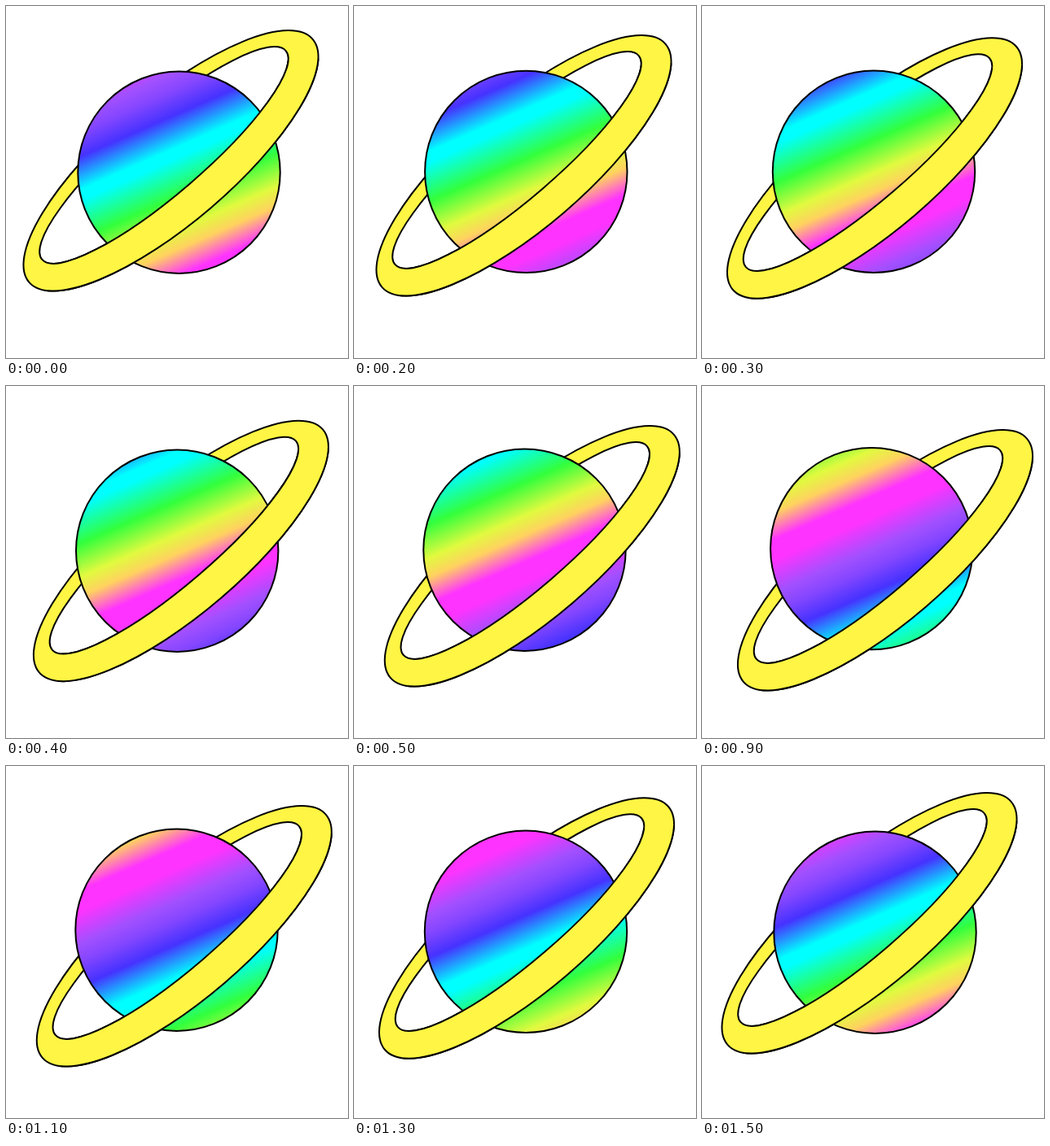
Animation, 420 px wide and 433 px high, one loop 1600 ms. Source, as an HTML page with a canvas:

```html
<!DOCTYPE html>
<html lang="en">
<head>
<meta charset="utf-8">
<title>Rainbow planet</title>
<style>
  html, body { margin: 0; width: 100%; height: 100%; overflow: hidden; background: #fff; }
  canvas { display: block; }
</style>
</head>
<body>
<canvas id="stage" width="420" height="433"></canvas>
<script>
const ctx = document.getElementById('stage').getContext('2d');

const STEP = 100;
const STEPS = 16;
const TILT = -40.65 * Math.PI / 180;
const SLOPE = 0.44;
const PERIOD = 318;

// Offsets per step on the way out; the way back mirrors them.
const ringX = [0, 3, 6, 9.5, 12.4, 16.3, 19.3, 22.5, 23.4];
const ringY = [0, 3, 6, 9.2, 12.6, 19, 22, 24, 26.2];
const planetX = [0, 0, -1.2, -1.5, -2.3, -3, -3.6, -4.2, -4.4];
const planetY = [0, 0, -0.8, -0.9, -2, -3, -3.7, -4.6, -5];

// Step and scroll distance of the color bands.
const scrollKeys = [[0, 0], [7, 163], [11, 232], [13, 267], [15, 305], [16, 318]];

// Distance down the band cycle and color.
const bands = [
  [14, '#ff33ff'], [39, '#ff33ff'], [79, '#a250ff'], [102, '#8446ff'],
  [132, '#4632ff'], [173, '#00ffff'], [186, '#00ffff'], [234, '#33ff3c'],
  [275, '#e1fa3f'], [299, '#ffd25f']
];

function scrollAt(step) {
  const i = scrollKeys.findIndex(key => key[0] > step);
  const [s0, d0] = scrollKeys[i - 1];
  const [s1, d1] = scrollKeys[i];
  return d0 + (d1 - d0) * (step - s0) / (s1 - s0);
}

function bandGradient(scroll) {
  const top = bands[0][0] - scroll;
  const length = PERIOD * 3;
  const reach = length / (1 + SLOPE * SLOPE);
  const gradient = ctx.createLinearGradient(212, top, 212 + SLOPE * reach, top + reach);
  for (let copy = 0; copy < 3; copy++) {
    for (const [at, color] of bands) {
      gradient.addColorStop((at - bands[0][0] + copy * PERIOD) / length, color);
    }
  }
  gradient.addColorStop(1, bands[0][1]);
  return gradient;
}

function drawRing(x, y) {
  const outer = new Path2D();
  outer.ellipse(202.5 + x, 190.3 + y, 229.5, 76, TILT, 0, Math.PI * 2);
  const inner = new Path2D();
  inner.ellipse(194 + x, 183.5 + y, 197.2, 47.3, TILT, 0, Math.PI * 2);
  const band = new Path2D(outer);
  band.addPath(inner);
  ctx.fillStyle = '#fff544';
  ctx.fill(band, 'evenodd');
  ctx.stroke(outer);
  ctx.stroke(inner);
}

function drawPlanet(x, y, scroll) {
  ctx.beginPath();
  ctx.arc(212.5 + x, 204.7 + y, 124.2, 0, Math.PI * 2);
  ctx.fillStyle = bandGradient(scroll);
  ctx.fill();
  ctx.stroke();
}

function clipToFront(x, y) {
  ctx.translate(202.5 + x, 190.3 + y);
  ctx.rotate(TILT);
  ctx.beginPath();
  ctx.rect(-220, 0, 440, 120);
  ctx.rotate(-TILT);
  ctx.translate(-202.5 - x, -190.3 - y);
  ctx.clip();
}

function draw(step) {
  const k = Math.min(step, STEPS - step);
  const x = ringX[k], y = ringY[k];
  ctx.fillStyle = '#fff';
  ctx.fillRect(0, 0, 420, 433);
  ctx.strokeStyle = '#000';
  ctx.lineWidth = 2;
  drawRing(x, y);
  drawPlanet(planetX[k], planetY[k], scrollAt(step));
  ctx.save();
  clipToFront(x, y);
  drawRing(x, y);
  ctx.restore();
}

function tick() {
  draw(Math.floor(performance.now() / STEP) % STEPS);
  requestAnimationFrame(tick);
}
tick();
</script>
</body>
</html>
```
